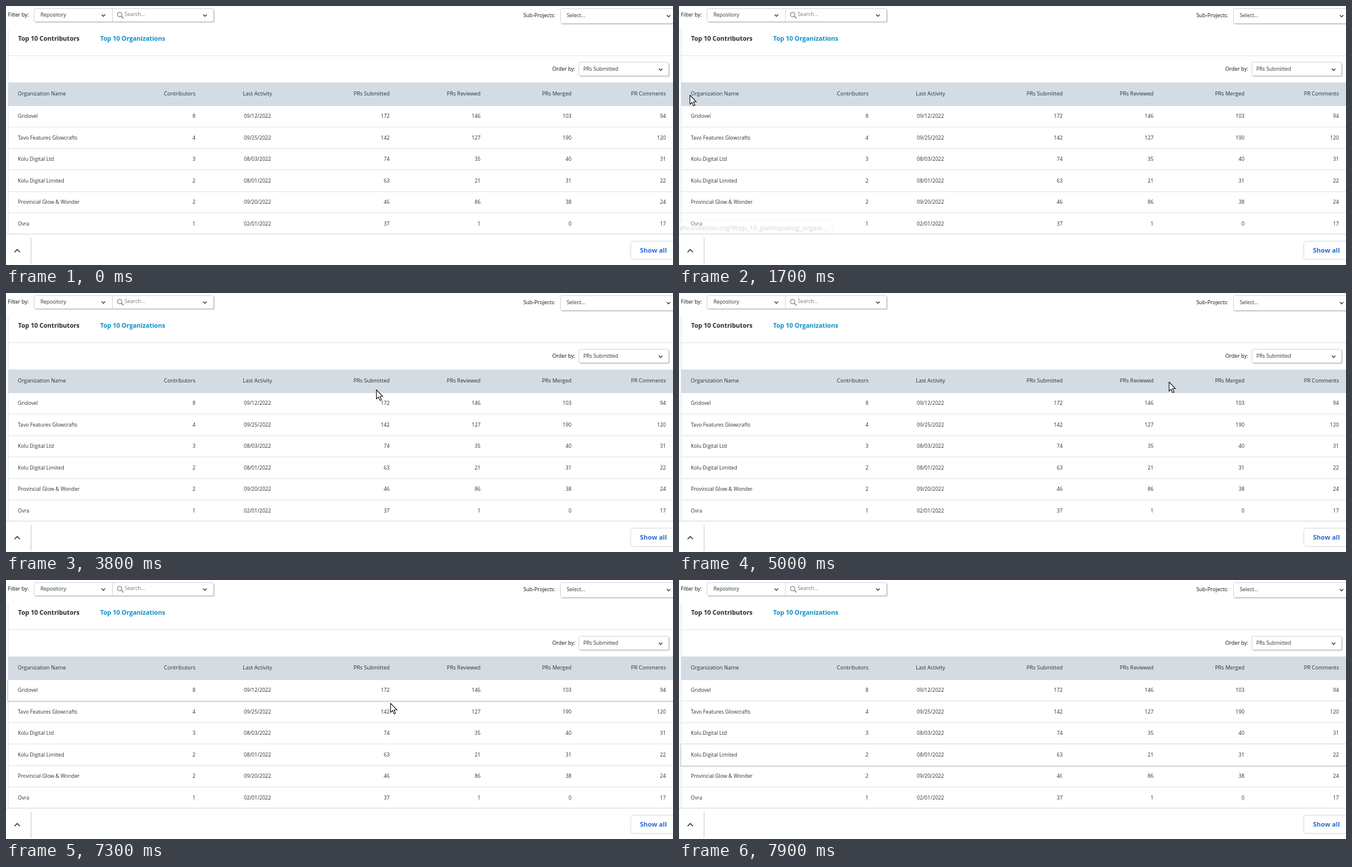
Recreate the animation shown at these times as an HTML page with a canvas. Size 1130 px wide and 440 px high, loop 8 s.

```html
<!DOCTYPE html>
<html lang="en">
<head>
<title>Top organizations</title>
<style>
html, body { margin: 0; width: 100%; height: 100%; overflow: hidden; background: #fff; }
canvas { display: block; width: 1130px; height: 440px; }
</style>
</head>
<body>
<canvas id="stage"></canvas>
<script>
const W = 1130, H = 440, LOOP = 8000, STEP = 100;
const canvas = document.getElementById('stage');
const ctx = canvas.getContext('2d');
const ratio = window.devicePixelRatio || 1;
canvas.width = W * ratio;
canvas.height = H * ratio;

const INK = '#2f3133', LINE = '#e0e2e4';
const ROW_TOP = 169.5, ROW_H = 36.5;

// x anchor, alignment, heading
const columns = [
  [20, 'left', 'Organization Name'],
  [321, 'right', 'Contributors'],
  [426, 'center', 'Last Activity'],
  [650, 'right', 'PRs Submitted'],
  [804, 'right', 'PRs Reviewed'],
  [958, 'right', 'PRs Merged'],
  [1118, 'right', 'PR Comments']
];
const rows = [
  ['Gridovel', '8', '09/12/2022', '172', '146', '103', '94'],
  ['Tavo Features Glowcrafts', '4', '09/25/2022', '142', '127', '190', '120'],
  ['Kolu Digital Ltd', '3', '08/03/2022', '74', '35', '40', '31'],
  ['Kolu Digital Limited', '2', '08/01/2022', '63', '21', '31', '22'],
  ['Provincial Glow & Wonder', '2', '09/20/2022', '46', '86', '38', '24'],
  ['Ovra', '1', '02/01/2022', '37', '1', '0', '17']
];

// pointer path: time, x, y
const path = [
  [0, 140, -30], [100, 141, -12], [800, 182, 57], [1200, 177, 60], [1300, 177, 60],
  [1500, 92, 108], [1700, 18, 151], [1800, 14, 154], [2000, 50, 155], [2200, 134, 154],
  [2400, 280, 155], [2500, 280, 155], [3400, 428.5, 147], [3500, 470, 150],
  [3800, 627, 164], [4000, 627, 164], [4300, 622.5, 151], [4900, 794.5, 150],
  [5300, 935.5, 153], [5400, 935.5, 153], [6000, 1114, 145], [6200, 1100, 144],
  [6300, 1085.5, 151], [6400, 1044, 159], [6500, 1044, 159], [7300, 651, 209],
  [7400, 651, 237], [7500, 651, 237], [7700, 650, 297], [7900, 649.5, 333], [8000, 649.5, 333]
];
const bubbleFade = [[800, 0], [900, 0.4], [1100, 1], [1500, 1], [1600, 0.62], [1700, 0.28], [1800, 0]];

function track(keys, t) {
  if (t <= keys[0][0]) return keys[0].slice(1);
  for (let i = 1; i < keys.length; i++) {
    const a = keys[i - 1], b = keys[i];
    if (t <= b[0]) {
      const k = (t - a[0]) / (b[0] - a[0]);
      return a.slice(1).map((v, j) => v + (b[j + 1] - v) * k);
    }
  }
  return keys[keys.length - 1].slice(1);
}

function text(str, x, y, size = 8.7, color = INK, align = 'left', weight = 400) {
  ctx.font = `${weight} ${size}px "Open Sans", "Noto Sans", sans-serif`;
  ctx.fillStyle = color;
  ctx.textAlign = align;
  ctx.fillText(str, x, y);
}

function rect(x, y, w, h, color) {
  ctx.fillStyle = color;
  ctx.fillRect(x, y, w, h);
}

function stroke(points, color, width) {
  ctx.beginPath();
  points.forEach(([x, y]) => ctx.lineTo(x, y));
  ctx.strokeStyle = color;
  ctx.lineWidth = width;
  ctx.stroke();
}

function roundBox(x, y, w, h, r, fill, border) {
  ctx.beginPath();
  ctx.roundRect(x + 0.5, y + 0.5, w - 1, h - 1, r);
  ctx.fillStyle = fill;
  ctx.fill();
  ctx.strokeStyle = border;
  ctx.lineWidth = 1;
  ctx.stroke();
}

function selectBox(x, y, w, h) {
  ctx.save();
  ctx.shadowColor = 'rgba(0,0,0,.28)';
  ctx.shadowBlur = 2;
  ctx.shadowOffsetX = ctx.shadowOffsetY = 1.5 * ratio;
  ctx.beginPath();
  ctx.roundRect(x + 0.5, y + 0.5, w - 1, h - 1, 2);
  ctx.fillStyle = '#fff';
  ctx.fill();
  ctx.restore();
  roundBox(x, y, w, h, 2, '#fff', '#d2d4d6');
}

function chevron(x, y, s, dir, width) {
  stroke([[x - s, y - s / 2 * dir], [x, y + s / 2 * dir], [x + s, y - s / 2 * dir]], '#3a3a3a', width);
}

function drawFilters() {
  text('Filter by:', 3, 18, 9, '#111');
  selectBox(47, 4, 305, 23);
  rect(180, 4, 1, 23, '#d2d4d6');
  text('Repository', 58.5, 18);
  chevron(165, 16, 3, 1, 1.4);
  ctx.beginPath();
  ctx.arc(192.5, 14.5, 3.7, 0, Math.PI * 2);
  ctx.strokeStyle = '#999';
  ctx.lineWidth = 1.6;
  ctx.stroke();
  stroke([[195.3, 17.3], [199, 21]], '#999', 2);
  text('Search...', 201, 17, 8.8, '#777');
  chevron(337, 16, 3, 1, 1.4);

  text('Sub-Projects:', 876.5, 19, 8.9, '#111');
  selectBox(939, 4, 200, 26);
  text('Select...', 950, 19, 8.9);
  chevron(1122.5, 17, 3, 1, 1.4);
}

function drawPanel() {
  rect(3, 40, 1, 347, '#dfe1e3');
  text('Top 10 Contributors', 20.5, 59, 10.6, '#26282a', 'left', 700);
  text('Top 10 Organizations', 159.5, 59, 10.6, '#0a8fc7', 'left', 700);
  rect(4, 84, W, 1, LINE);
  text('Order by:', 925.5, 110, 8.9, '#111');
  selectBox(970, 95, 153, 24);
  text('PRs Submitted', 978, 110);
  chevron(1109, 108, 3, 1, 1.4);
}

function drawTable(hover) {
  rect(4, 130, W, 40, '#d3dce3');
  rows.forEach((_, i) => {
    if (i) rect(4, Math.floor(ROW_TOP + i * ROW_H - 0.5), W, 1, LINE);
  });
  if (hover >= 0) {
    const top = Math.floor(ROW_TOP + hover * ROW_H), end = top + 36;
    rect(2, top, 1.5, 38, '#d4d5d7');
    if (hover) rect(3, top - 1, W, 1, '#d2d4d6');
    rect(3, end, W, 2.5, '#d6d8da');
  }
  columns.forEach(([x, align, head], c) => {
    text(head, x, 152, 9, '#27323b', align);
    rows.forEach((row, r) => text(row[c], x, 190 + Math.round(r * ROW_H), 8.7, INK, align));
  });
}

function drawFooter() {
  rect(0, 387, W, 53, '#fff');
  rect(0, 387, W, 1, '#d3d5d7');
  rect(42, 394, 1, 44, '#c4c6c8');
  chevron(19, 416, 4.5, -1, 1.7);
  roundBox(1058, 399, 90, 32, 4, '#fff', '#d5d8dc');
  text('Show all', 1074, 419, 11, '#2a6bd4', 'left', 700);
}

function drawBubble(alpha) {
  if (alpha <= 0) return;
  ctx.save();
  ctx.globalAlpha = alpha;
  roundBox(-6, 364, 266, 23, 3, '#fff', '#d8dadd');
  text('xfoundation.org/#top_10_participating_organi...', 0, 381, 11.35, '#5f6368');
  ctx.restore();
}

function shape(points) {
  ctx.beginPath();
  points.forEach(([x, y]) => ctx.lineTo(x, y));
  ctx.closePath();
  ctx.fillStyle = '#fff';
  ctx.fill();
  ctx.strokeStyle = '#111';
  ctx.lineWidth = 1.1;
  ctx.lineJoin = 'round';
  ctx.stroke();
}

const cursors = {
  arrow() {
    shape([[0.5, 0.5], [0.5, 16], [4, 12.7], [6.6, 18.4], [9, 17.4], [6.5, 11.8], [11.3, 11.6]]);
  },
  hand() {
    shape([[-1.5, 1.5], [0, 0.5], [1.5, 1.5], [1.5, 8], [3, 7], [4.5, 8.3], [6, 7.7], [7.3, 9.2],
      [9, 8.8], [10.3, 10.5], [10.3, 16], [8, 19.5], [8, 22.5], [-1, 22.5], [-1, 20],
      [-5.5, 14], [-5.5, 12], [-3.5, 11.7], [-1.5, 14]]);
    [1.5, 4.5, 7.3].forEach((x, i) => stroke([[x, 8 + i * 0.4], [x, 12]], '#111', 1));
  },
  beam() {
    rect(-0.5, -7, 1, 14, '#fff');
    [-8, 7].forEach(y => { rect(-3, y, 2.5, 1, '#fff'); rect(0.5, y, 2.5, 1, '#fff'); });
  }
};

function overText(x, y) {
  return columns.some(([cx, align, head], c) => {
    const hit = (str, mid, size) => {
      if (y < mid - 7 || y > mid + 6.5) return false;
      ctx.font = `${size}px "Open Sans", "Noto Sans", sans-serif`;
      const w = ctx.measureText(str).width;
      const left = cx - (align === 'right' ? w : align === 'center' ? w / 2 : 0);
      return x >= left && x <= left + w;
    };
    return hit(head, 148, 9) || rows.some((row, r) => hit(row[c], 187 + r * ROW_H, 8.7));
  });
}

function drawCursor(x, y) {
  const onLink = x > 159 && x < 272 && y > 46 && y < 64;
  const kind = onLink ? 'hand' : overText(x, y) ? 'beam' : 'arrow';
  ctx.save();
  ctx.translate(x, y);
  cursors[kind]();
  ctx.restore();
}

function render(t) {
  ctx.setTransform(ratio, 0, 0, ratio, 0, 0);
  rect(0, 0, W, H, '#fff');
  // the highlight trails the pointer by one step
  const seenY = track(path, Math.max(0, t - STEP))[1];
  const hover = seenY < ROW_TOP ? -1 : Math.floor((seenY - ROW_TOP) / ROW_H);
  drawFilters();
  drawPanel();
  drawTable(hover);
  drawBubble(track(bubbleFade, t)[0]);
  drawFooter();
  drawCursor(...track(path, t));
}

const start = performance.now();
function tick() {
  const t = (performance.now() - start) % LOOP;
  render(Math.floor(t / STEP) * STEP);
  requestAnimationFrame(tick);
}
tick();
</script>
</body>
</html>
```
